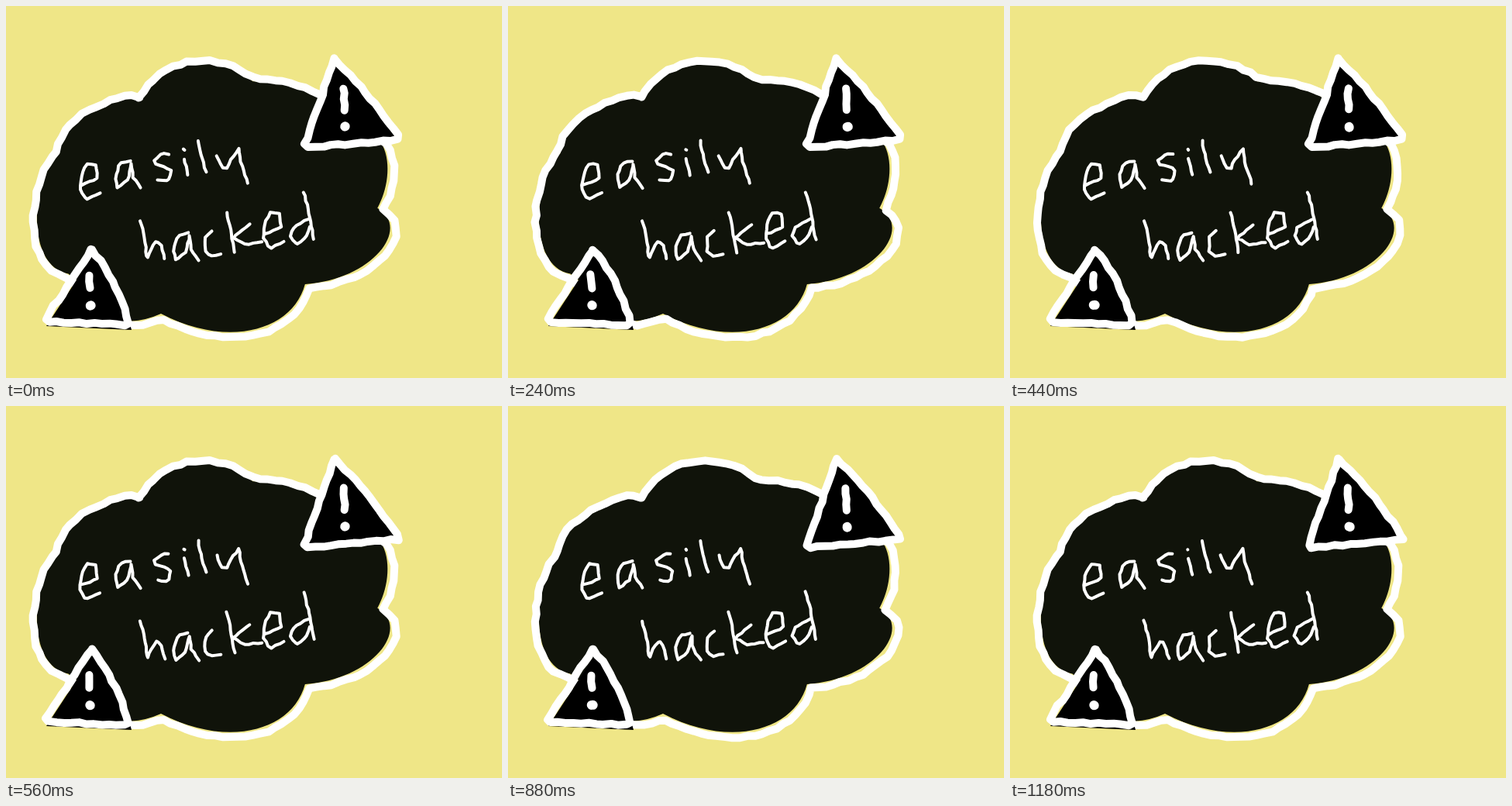
Recreate the animation shown at these times as an HTML page with a canvas. Size 640 by 480 pixels, loop 1.2 s.

```html
<!DOCTYPE html>
<html lang="en">
<head>
<meta charset="utf-8">
<title>easily hacked</title>
<style>
  html, body { margin: 0; width: 100%; height: 100%; overflow: hidden; background: #efe687; }
  canvas { display: block; }
</style>
</head>
<body>
<canvas id="stage" width="640" height="480"></canvas>
<script>
const ctx = document.getElementById('stage').getContext('2d');
ctx.lineCap = ctx.lineJoin = 'round';

const LOOP = 1200, SLOT = 20, DRAWINGS = 51, POSES = 5;

// One curve per lobe; the straight gaps lie hidden behind the signs.
const cloud = `M172,118 C195,72 265,50 322,95 Q370,95 405,114
  L494,180 C506,205 500,240 487,263 C533,290 480,358 391,364
  C375,425 290,450 200,403 Q180,412 160,413
  L77,350 C20,340 28,225 64,190 C72,145 115,128 158,114 Z`;
const bigSign = 'M424,68 L384,183 L509,172 Q468,110 424,68 Z';
const smallSign = 'M110,314 L49,407 L159,412 Q146,358 110,314 Z';

const e = 'l21,-8 -2,-18 -11,-2 -7,12 -3,21 8,14 18,-9';
const a = 'l-13,3 -6,17 3,15 13,-11 5,-21 2,18 10,14';
const easily = [
  'M97,231' + e,
  'M160,200' + a,
  'M210,191 l-8,-1 -11,9 2,5 20,7 -3,15 -14,-1',
  'M229,185 l1,1',
  'M230,197 l5,21',
  'M248,174 l3,16 7,24',
  'M272,193 l7,16 6,0 6,-12 10,-13 2,17 9,28'
];
const hacked = [
  'M173,277 l6,22 3,27 4,-10 9,-14 5,7 5,17',
  'M235,293' + a,
  'M266,290 l-9,9 0,18 7,6 13,-3',
  'M285,266 l5,24 5,28',
  'M314,282 l-21,17 16,9 21,-3',
  'M334,294' + e,
  'M384,240 l6,22 7,39',
  'M390,275 l-19,10 -4,12 8,12 13,-12 4,-12'
];

// Samples a path at even steps, so that every sample can wobble.
function stroke(d, width, wobble, step) {
  const path = document.createElementNS('http://www.w3.org/2000/svg', 'path');
  path.setAttribute('d', d);
  const length = path.getTotalLength(), n = Math.ceil(length / step);
  const points = Array.from({ length: n + 1 }, (_, i) => path.getPointAtLength(length * i / n));
  return { points, width, wobble };
}

const brush = d => stroke(d, 10, 1.2, 10);
const pen = d => stroke(d, 4, 0.7, 6);
const exclamation = (x, y, height) => [
  stroke(`M${x - 1},${y} l1,${height}`, 10, 0.9, 9),
  stroke(`M${x},${y + height + 22} l1,0`, 12, 0.9, 9)
];

const outline = brush(cloud);
const foreground = [
  brush(bigSign), brush(smallSign),
  ...exclamation(437, 106, 28), ...exclamation(108, 347, 17),
  ...[...easily, ...hacked].map(pen)
];
[outline, ...foreground].forEach((s, id) => s.id = id);

function random(seed) {
  let h = Math.imul(seed + 1, 0x9e3779b1);
  h = Math.imul(h ^ h >>> 16, 0x85ebca6b);
  h = Math.imul(h ^ h >>> 13, 0xc2b2ae35);
  return ((h ^ h >>> 16) >>> 0) / 4294967296;
}

// Each stroke shows one of a few redrawn poses, picked anew for every drawing.
function drawStroke({ points, width, wobble, id }, drawing) {
  const pose = Math.floor(random(drawing * 61 + id) * POSES);
  let seed = (id * POSES + pose) * 1000;
  const shake = () => (random(seed++) * 2 - 1) * wobble;
  ctx.strokeStyle = '#fff';
  ctx.lineWidth = width;
  ctx.beginPath();
  points.forEach(p => ctx.lineTo(p.x + shake(), p.y + shake()));
  ctx.stroke();
}

function fill(d, color, x = 0, y = 0, scale = 1) {
  ctx.save();
  ctx.translate(x, y);
  ctx.scale(scale, scale);
  ctx.fillStyle = color;
  ctx.fill(new Path2D(d));
  ctx.restore();
}

function draw(time) {
  const slot = Math.floor(time % LOOP / SLOT);
  const drawing = Math.floor(slot * SLOT * DRAWINGS / LOOP);
  ctx.fillStyle = '#efe687';
  ctx.fillRect(0, 0, 640, 480);
  // Slightly too small, so that slivers of background show inside the outline.
  fill(cloud, '#10130a', 5.4, 4.9, 0.973);
  drawStroke(outline, drawing);
  fill(bigSign, '#000');
  fill(smallSign, '#000', 3, 6);
  foreground.forEach(s => drawStroke(s, drawing));
}

const start = performance.now();
function tick() {
  draw(performance.now() - start);
  requestAnimationFrame(tick);
}
tick();
</script>
</body>
</html>
```
